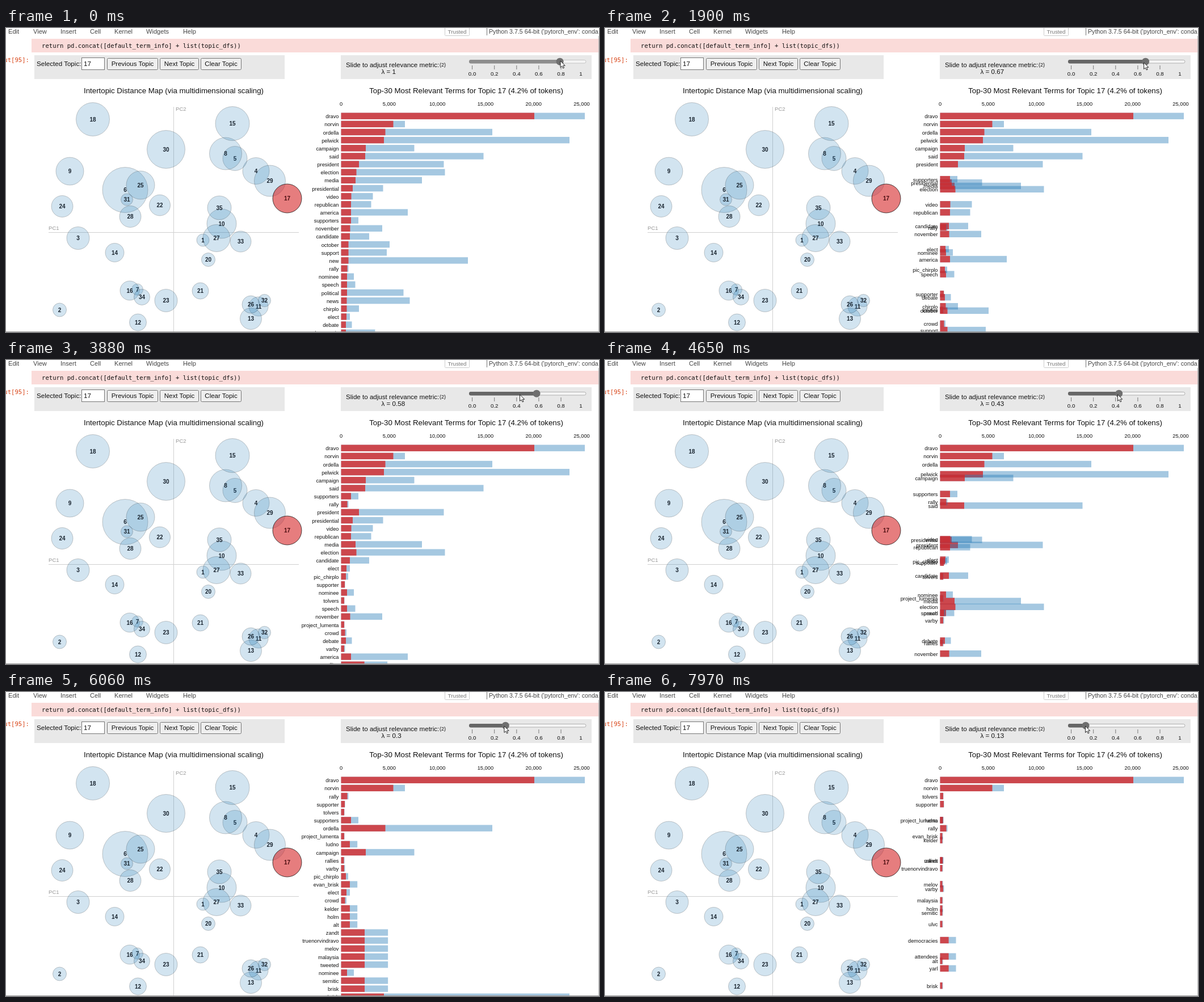
An HTML page that plays this animation: 1045x536 px, repeating every 8000 ms.

```html
<!DOCTYPE html>
<html>
<head>
<meta charset="utf-8">
<title>Topic relevance slider</title>
<style>
html, body { margin: 0; width: 100%; height: 100%; overflow: hidden; background: #fff; }
svg { display: block; width: 1045px; height: 536px; font-family: "Liberation Sans", Arial, sans-serif; }
.mono { font-family: "DejaVu Sans Mono", "Liberation Mono", monospace; white-space: pre; }
</style>
</head>
<body>
<svg id="stage" viewBox="0 0 1045 536"></svg>
<script>
const stage = document.getElementById('stage');

function el(tag, attrs, parent = stage) {
  const node = document.createElementNS('http://www.w3.org/2000/svg', tag);
  for (const k in attrs) node.setAttribute(k, attrs[k]);
  return parent.appendChild(node);
}
function rect(x, y, width, height, fill, more, parent) {
  return el('rect', { x, y, width, height, fill, ...more }, parent);
}
function line(x1, y1, x2, y2, stroke) {
  return el('line', { x1, y1, x2, y2, stroke });
}
function text(str, x, y, size, more, parent) {
  const node = el('text', { x, y, 'font-size': size, fill: '#111', ...more }, parent);
  node.textContent = str;
  return node;
}
const MID = { 'text-anchor': 'middle' }, END = { 'text-anchor': 'end' };

// Notebook header and code cell
[['Edit', 4], ['View', 48], ['Insert', 96], ['Cell', 148], ['Kernel', 191], ['Widgets', 247], ['Help', 312]]
  .forEach(([s, x]) => text(s, x, 9.5, 11.1, { fill: '#444' }));
rect(773.5, -5.5, 43, 19, '#fff', { stroke: '#ccc', rx: 1 });
text('Trusted', 795, 9.5, 9.8, { ...MID, fill: '#777' });
line(847.5, 0, 847.5, 13, '#777');
text("Python 3.7.5 64-bit ('pytorch_env': conda", 851, 9.5, 10.65, { fill: '#444' });
rect(45, 19, 999, 24, '#fadbd9');
text('return pd.concat([default_term_info] + list(topic_dfs))', 63, 35, 10.6, { class: 'mono' });
text('Out[95]:', 41, 59.5, 10.6, { class: 'mono', fill: '#d84315', ...END });

// Topic controls
rect(50, 48, 441, 42, '#e8e8e8');
text('Selected Topic:', 54, 67, 11.6);
rect(133.5, 52.5, 40, 21, '#fff', { stroke: '#767676' });
text('17', 137, 67, 11.6);
[['Previous Topic', 178.5, 89], ['Next Topic', 271.5, 68], ['Clear Topic', 343.5, 71]].forEach(([s, x, w]) => {
  rect(x, 53.5, w, 20, '#efefef', { stroke: '#767676', rx: 2 });
  text(s, x + w / 2, 67, 11.5, MID);
});

// Relevance slider
const sliderX = v => 821.6 + 195.5 * v;
rect(590, 48, 442, 42, '#e8e8e8');
text('Slide to adjust relevance metric:', 599, 69, 11.6);
text('(2)', 764, 68, 9);
const lambdaLabel = text('', 661.5, 81, 11.6);
for (let i = 0; i < 5; i++) {
  line(sliderX(i / 5), 66, sliderX(i / 5), 73, '#777');
  text((i / 5).toFixed(1), sliderX(i / 5), 83.5, 9.8, MID);
}
text('1', 1013, 83.5, 9.8, MID);
const track = rect(816.5, 56.5, 205.5, 5.5, '#f4f4f4', { stroke: '#b2b2b2', rx: 2.8 });
const fill = rect(816, 56, 0, 6.5, '#666', { rx: 3 });
const thumb = el('circle', { cy: 59.2, r: 6.5, fill: '#6f6f6f' });

// Topic map: id, x, y, radius
text('Intertopic Distance Map (via multidimensional scaling)', 295.5, 115, 13.3, MID);
line(75, 360.5, 516, 360.5, '#d0d0d0');
line(295.5, 139, 295.5, 536, '#d0d0d0');
text('PC1', 75, 356, 9.6, { fill: '#999' });
text('PC2', 299, 146, 9.6, { fill: '#999' });
`1 347 374 11;2 94.5 497 12;3 127 370.5 20;4 440.5 252 23.5;5 403.5 230 21.5;6 210 285.5 40;7 231.5 461 10
8 387 221.5 28.5;9 112.5 252.5 24.5;10 380 345 26;11 445 491 17;12 232.5 519 15;13 431.5 512.5 19;14 191.5 396 16.5
15 399 168.5 30;16 218 463 17;18 153 161 29.5;20 356.5 408.5 12;21 342.5 463.5 14.5;22 271 312.5 18.5;23 282 480.5 20
24 99 314.5 19;25 237 277 25;26 431.5 487.5 15.5;27 371 370.5 24;28 219 332.5 19;29 465 269.5 27.5;30 282 214 33.5
31 213 302.5 10.5;32 455.5 480.5 11;33 413.5 376.5 18.5;34 239.5 474.5 14;35 376 317 21;17 495.5 300.5 25.5`
  .split(/[;\n]/).forEach(row => {
    const [id, cx, cy, r] = row.split(' ').map(Number), chosen = id === 17;
    el('circle', {
      cx, cy, r, fill: chosen ? '#d62728' : '#1f77b4', 'fill-opacity': chosen ? 0.6 : 0.2,
      stroke: '#000', 'stroke-opacity': chosen ? 0.7 : 0.2
    });
    text(id, cx, cy + 3.7, 10, { ...MID, 'font-weight': 'bold', fill: chosen ? '#4a0d10' : '#1a2530' });
  });

// Term chart
text('Top-30 Most Relevant Terms for Topic 17 (4.2% of tokens)', 811, 115, 13.3, MID);
for (let i = 0; i < 6; i++) text((i * 5000).toLocaleString('en-US'), 590.5 + 84.8 * i, 137, 9.3, MID);

// Bar lengths in pixels: in topic, overall
const sizes = {};
`dravo 340.5 429.5;norvin 92 112.5;ordella 78 266.5;pelwick 75.5 402.5;campaign 43.5 129;said 42.5 251
president 31.5 181;election 27 183;media 25.5 142.5;presidential 20.5 74;video 18 56;republican 17.5 53
america 17.5 117.5;supporters 17.5 30.5;november 16 72.5;candidate 15.5 49.5;october 13 85.5;support 13 80.5
new 13 223.5;rally 11 13;nominee 10.5 22.5;speech 10.5 25;political 10.5 110;news 10 121;chirplo 10 31.5
elect 9.5 15.5;debate 8.5 19;democratic 8.5 60;pic_chirplo 8.5 12.5;crowd 7 9.5;supporter 6.5 7
tolvers 5.5 6;project_lumenta 5.5 6;varby 5.5 7;rallies 5 6`
  .split(/[;\n]/).forEach(row => {
    const [term, ...w] = row.split(' ');
    sizes[term] = w.map(Number);
  });

// Each step: release time, lambda, ranking ("-" is a place never seen)
const steps = [
  [-1e4, 1, `dravo norvin ordella pelwick campaign said president election media presidential video republican
    america supporters november candidate october support new rally nominee speech political news chirplo elect
    debate democratic pic_chirplo -`],
  [205, 0.79, `dravo norvin ordella pelwick campaign said president election media presidential supporters video
    republican candidate november america rally nominee elect speech october support pic_chirplo chirplo debate
    supporter liberal tolvers crowd varby`],
  [1540, 0.67, `dravo norvin ordella pelwick campaign said president supporters presidential media election video
    republican rally candidate november elect nominee pic_chirplo america speech supporter debate tolvers chirplo
    crowd october project_lumenta varby support`],
  [3160, 0.58, `dravo norvin ordella pelwick campaign said supporters rally president presidential video republican
    media election candidate elect pic_chirplo supporter nominee tolvers speech november project_lumenta crowd
    debate varby america rallies chirplo october`],
  [4398, 0.43, `dravo norvin ordella campaign pelwick supporters rally supporter tolvers pic_chirplo project_lumenta
    elect varby said crowd video republican rallies presidential nominee ludno candidate speech president debate
    evan_brisk alt holm kelder chirplo`],
  [5375, 0.3, `dravo norvin rally supporter tolvers supporters ordella project_lumenta ludno campaign rallies varby
    pic_chirplo evan_brisk elect crowd kelder holm alt zandt truenorvindravo melov malaysia tweeted nominee semitic
    brisk pelwick ulvc -`],
  [6680, 0.21, `dravo norvin tolvers supporter rally ludno project_lumenta evan_brisk rallies kelder varby zandt
    truenorvindravo brisk holm melov malaysia semitic supporters alt elect crowd tweeted ulvc attendees democracies
    yarl ordella pic_chirplo campaign`],
  [7660, 0.13, `dravo norvin tolvers supporter project_lumenta ludno kelder evan_brisk rally zandt truenorvindravo
    melov rallies ulvc malaysia democracies semitic varby holm - attendees yarl - - - - alt - - -`]
].map(([time, lambda, list]) => ({ time, lambda, terms: list.split(/\s+/) }));

const STAGE_MS = 620, PRESS_MS = 210, OFF_RANK = 38;
const clamp = v => Math.max(0, Math.min(1, v));
const ease = v => (v = clamp(v)) < 0.5 ? 4 * v ** 3 : 1 - 4 * (1 - v) ** 3;
const mix = (a, b, p) => a + (b - a) * p;

const names = [...new Set(steps.flatMap(s => s.terms))].filter(n => n !== '-');
const bars = names.map(name => {
  const g = el('g', {});
  return {
    g, size: sizes[name] || [4, 5],
    ranks: steps.map(s => s.terms.indexOf(name)),
    total: rect(590.5, -5.7, 0, 11.4, '#1f77b4', { opacity: 0.4 }, g),
    topic: rect(590.5, -5.7, 0, 11.4, '#d62728', { opacity: 0.8 }, g),
    label: text(name, 586.5, 4, 9.25, END, g)
  };
});

// Newcomers arrive with a fixed length, which shrinks after each move
function excess(ranks, now, t) {
  let rest = 0;
  for (let i = 1; i <= now; i++) {
    if (ranks[i] < 0) continue;
    if (ranks[i - 1] < 0) rest = 1;
    const until = i < now ? steps[i + 1].time : t;
    rest *= 1 - ease((until - steps[i].time - STAGE_MS) / STAGE_MS);
  }
  return rest;
}

function drawBar(bar, now, t) {
  const place = i => bar.ranks[i] < 0 ? OFF_RANK : bar.ranks[i];
  const rank = mix(place(Math.max(0, now - 1)), place(now), ease((t - steps[now].time) / STAGE_MS));
  const rest = excess(bar.ranks, now, t);
  bar.g.setAttribute('transform', `translate(0 ${155.2 + 14.15 * rank})`);
  bar.topic.setAttribute('width', mix(bar.size[0], 41.7, rest));
  bar.total.setAttribute('width', mix(bar.size[1], 83, rest));
}

line(0, 535.5, 1045, 535.5, '#999');
line(1044.5, 14, 1044.5, 536, '#bbb');

const cursor = el('path', { d: 'M0 0V11.5L2.7 9L4.6 13L6.5 12.2L4.7 8.3H8.2Z', fill: '#fff', stroke: '#111', 'stroke-width': 0.9 });
const path = [[0, 977, 58], [250, 977, 58], [800, 954, 61], [1650, 954, 61], [2300, 935, 61], [3250, 935, 61],
  [3800, 905.5, 61], [4500, 905.5, 61], [5050, 881, 59.5], [5750, 881, 59.5], [6050, 878, 60], [6420, 862.5, 60],
  [6850, 862.5, 60], [7350, 846.5, 60], [8000, 846.5, 60]];

function drawCursor(t) {
  const i = path.findIndex(k => k[0] > t), [t0, x0, y0] = path[i - 1], [t1, x1, y1] = path[i];
  const p = ease((t - t0) / (t1 - t0));
  cursor.setAttribute('transform', `translate(${mix(x0, x1, p)} ${mix(y0, y1, p)})`);
}

function draw(t) {
  const now = steps.filter(s => s.time <= t).length - 1;
  const held = steps.filter(s => s.time - PRESS_MS <= t).length - 1;
  const x = sliderX(steps[held].lambda);
  lambdaLabel.textContent = 'λ = ' + steps[now].lambda;
  thumb.setAttribute('cx', x);
  fill.setAttribute('width', x - 816);
  fill.setAttribute('fill', held > now ? '#8d8d8d' : '#666');
  track.setAttribute('stroke', held > now ? '#c6c6c6' : '#b2b2b2');
  bars.forEach(bar => drawBar(bar, now, t));
  drawCursor(t);
}

const start = performance.now();
function tick() {
  draw((performance.now() - start) % 8000);
  requestAnimationFrame(tick);
}
tick();
</script>
</body>
</html>
```
